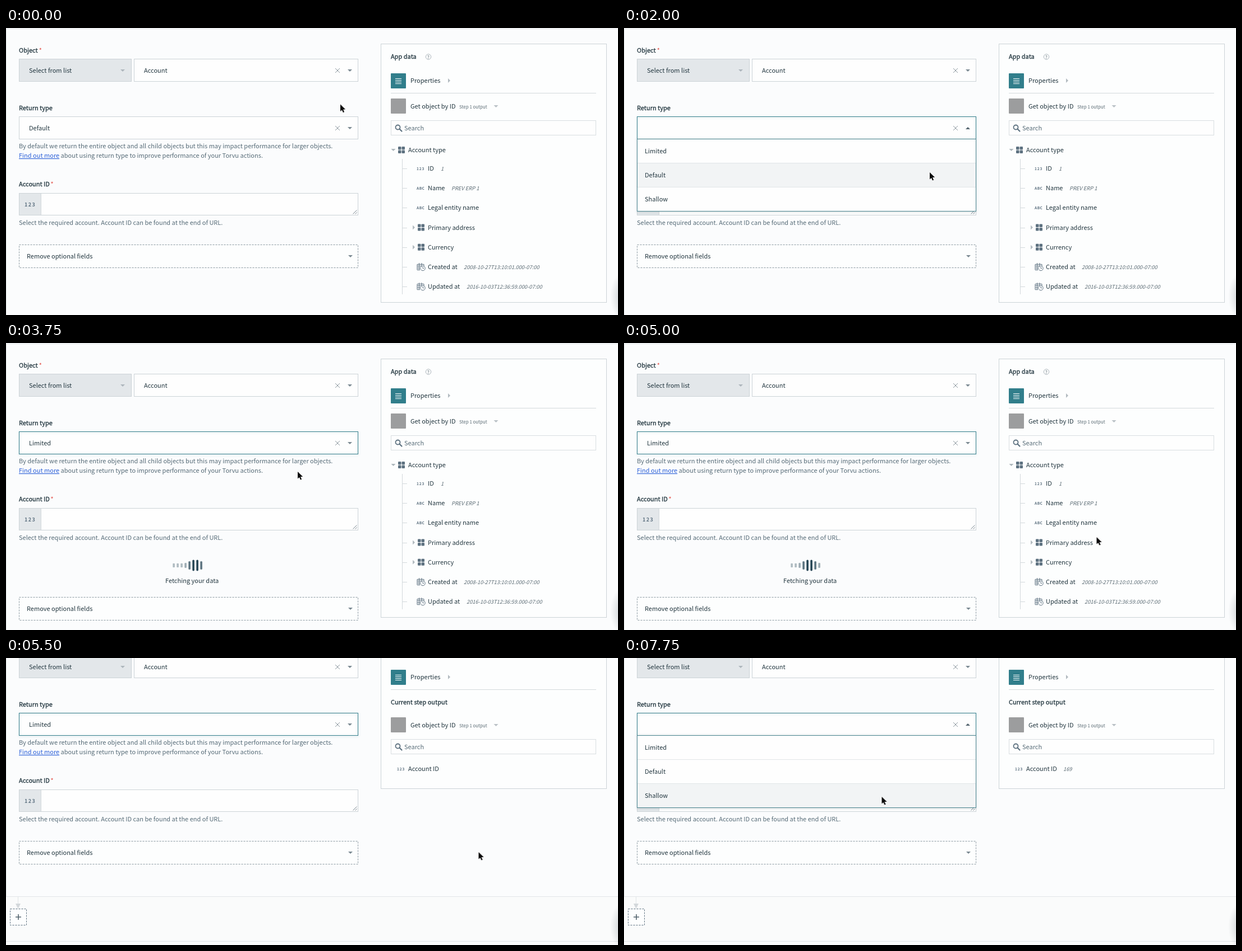
An HTML page that plays this animation: 1091 px wide and 513 px high, repeating every 8 s.

```html
<!DOCTYPE html>
<html lang="en">
<head>
<meta charset="utf-8">
<title>Return type</title>
<style>
html, body { margin: 0; width: 100%; height: 100%; overflow: hidden; background: #fbfcfd; }
svg { display: block; }
text { font: 11px "Noto Sans CJK JP", "Noto Sans CJK SC", "Noto Sans CJK KR", "Lato", sans-serif; fill: #22363f; white-space: pre; }
.label { font-weight: 500; stroke: #22363f; stroke-width: .3px; }
.req { fill: #e2453c; stroke: none; }
.help { fill: #566b77; }
.link { fill: #2a5fd8; text-decoration: underline; }
.sample { font-size: 9.35px; font-style: italic; fill: #5a6a73; }
.small { font-size: 7.9px; fill: #5a6a73; }
.type { font-size: 6.6px; font-weight: 700; letter-spacing: .9px; fill: #5d7180; }
.abc { letter-spacing: .4px; }
.num { font-size: 9px; letter-spacing: 1.5px; }
.box { fill: #fefefe; stroke: #ccd3d7; }
.rule { stroke: #d3d9dc; fill: none; }
.faint { stroke: #e1e5e7; fill: none; }
.dash { fill: #fdfefe; stroke: #8b99a1; stroke-dasharray: 3 2; }
.icon { fill: none; stroke: #5d7180; }
.focus { fill: none; stroke: #37808d; filter: drop-shadow(0 1px 2px rgba(55, 128, 141, .3)); }
.menu { fill: #fefefe; stroke: #4b8590; filter: drop-shadow(0 1px 2px rgba(40, 70, 80, .2)); }
</style>
</head>
<body>
<svg id="stage" width="1091" height="513" viewBox="0 0 1091 513"></svg>
<script>
const LOOP = 8000, TICK = 250;
const stage = document.getElementById('stage');

const text = (x, y, s, cls = '') => `<text x="${x}" y="${y}" class="${cls}">${s}</text>`;
const rect = (x, y, w, h, attrs) => `<rect x="${x}" y="${y}" width="${w}" height="${h}" ${attrs}/>`;
const path = (d, attrs) => `<path d="${d}" ${attrs}/>`;
const group = (id, body, attrs = '') => `<g id="${id}" ${attrs}>${body}</g>`;
const down = (x, y, c = '#7b8992') => path(`M${x - 4} ${y - 2}h8l-4 4z`, `fill="${c}"`);
const up = (x, y) => path(`M${x - 4} ${y + 2}h8l-4 -4z`, 'fill="#52636d"');
const right = (x, y) => path(`M${x - 2} ${y - 4}v8l4 -4z`, 'fill="#b3bbc0"');
const clear = y => path(`M587 ${y - 4}l8 8m0 -8l-8 8`, 'fill="none" stroke="#8a969d"');
const label = (y, s, req) => text(23, y, s + (req ? '<tspan class="req" dx="2">*</tspan>' : ''), 'label');

const grid = (x, y) => [0, 1, 2, 3].map(i =>
  rect(x - 6 + i % 2 * 6.5, y - 6 + (i >> 1) * 6.5, 5.5, 5.5, 'rx="1" fill="#5d7180"')).join('');

const calendar = (x, y) =>
  path(`M${x + 6} ${y + 5.5}h-5v-10h12v4M${x + 1} ${y - 1.5}h8M${x + 1} ${y + 2}h5M${x + 4.5} ${y - 7}v12M${x + 9} ${y - 7}v5`, 'class="icon"') +
  `<circle cx="${x + 11}" cy="${y + 2.5}" r="4.2" class="icon" style="fill:#fdfefe"/>` +
  path(`M${x + 11} ${y}v2.5h2`, 'class="icon"');

const form =
  label(44, 'Object', true) +
  rect(23.5, 55.5, 200, 40, 'fill="#e3e7ea" stroke="#ccd3d7"') + text(41, 80, 'Select from list') + down(208, 76, '#adb6bc') +
  rect(228.5, 55.5, 399, 40, 'class="box"') + text(246, 80, 'Account') + clear(76) + down(613, 76) +
  label(147, 'Return type') +
  text(23, 215, 'By default we return the entire object and all child objects but this may impact performance for larger objects.', 'help') +
  text(23, 232, '<tspan class="link">Find out more</tspan> about using return type to improve performance of your Torvu actions.', 'help') +
  label(283, 'Account ID', true) +
  rect(23.5, 295.5, 604, 39, 'class="box"') +
  rect(24, 296, 38, 38, 'fill="#e3e7ea"') + path('M62.5 296v38', 'class="rule"') + text(33, 318.5, '123', 'type num') +
  path('M618.5 332.5l7 -7m-3 7l3 -3', 'fill="none" stroke="#75838c"') +
  text(23, 352, 'Select the required account. Account ID can be found at the end of URL.', 'help') +
  group('optional', rect(23.5, 387.5, 604, 41, 'class="dash"') + text(37, 412, 'Remove optional fields') + down(614, 408));

const bars = Array.from({ length: 8 }, (_, i) =>
  rect(297.3 + i * 7, 387.5, 3.6, 20, 'rx="1.8" fill="#274655" class="bar" style="transform-box:fill-box;transform-origin:center"')).join('');
const loader = group('loader', bars + text(284, 429, 'Fetching your data', 'fetch'));

const picker =
  rect(23.5, 158.5, 604, 40, 'class="box"') +
  rect(23.5, 158.5, 604, 40, 'class="focus" id="focus"') +
  rect(23.5, 158.5, 604, 40, 'fill="none" stroke="#9ab8c0" id="blurred"') +
  group('valueDefault', text(41, 183, 'Default')) + group('valueLimited', text(41, 183, 'Limited')) +
  clear(179) + group('closed', down(613, 179)) + group('opened', up(613, 179)) +
  group('menu',
    rect(23.5, 198.5, 604, 129, 'class="menu"') +
    rect(24, 199, 603, 42, 'fill="#f2f4f5" id="hover"') +
    path('M24 241.5h603M24 284.5h603', 'class="faint"') +
    ['Limited', 'Default', 'Shallow'].map((s, i) => text(37, 224 + i * 43.2, s)).join(''));

const sourceRow =
  rect(686, 126, 27, 27, 'rx="1" fill="#9c9d9e"') +
  text(721, 144, 'Get object by ID') + text(808, 143.5, 'Step 1 output', 'small') + down(873.5, 140, '#b9c0c5') +
  rect(686.5, 165.5, 365, 26, 'fill="#fefefe" stroke="#d9dee1"') +
  `<circle cx="698.5" cy="177.5" r="4" class="icon" stroke-width="1.8"/>` +
  path('M701.5 180.5l4 4', 'class="icon" stroke-width="2.2" stroke-linecap="round"') +
  text(710, 183, 'Search', 'help');

const fields = [
  ['num', 'ID', 775, '1'], ['abc', 'Name', 794, 'PREV ERP 1'], ['abc', 'Legal entity name'],
  ['grid', 'Primary address'], ['grid', 'Currency'],
  ['date', 'Created at', 816, '2008-10-27T13:10:01.000-07:00'],
  ['date', 'Updated at', 821, '2016-10-03T12:36:59.000-07:00']
];
const fieldRow = ([kind, name, x, sample], i) => {
  const y = 251 + i * 35.2;
  const icon = {
    num: () => text(732, y + 2.5, '123', 'type'),
    abc: () => text(732, y + 2.5, 'ABC', 'type abc'),
    grid: () => right(727, y) + grid(740, y),
    date: () => calendar(732, y)
  }[kind]();
  return path(`M706 ${Math.round(y) + .5}h9`, 'class="rule"') + icon + text(752, y + 4, name) +
    (sample ? text(x, y + 4, sample, 'sample') : '');
};
const tree = group('tree',
  down(690.5, 218, '#aeb7bc') + grid(705, 218) + text(717, 222, 'Account type') +
  path('M706.5 234v242', 'class="rule"') + fields.map(fieldRow).join(''));

const panel =
  rect(668.5, 28.5, 402, 462, 'fill="#fdfefe" stroke="#ccd3d7" id="panel"') +
  text(686, 55, 'App data', 'label') +
  '<circle cx="753" cy="51.5" r="4.7" fill="none" stroke="#a9b3b9"/>' + text(751, 54.5, '?', 'small') +
  rect(686, 81, 27, 27, 'rx="1" fill="#317e8b"') +
  path('M694 90.5h11m-11 3h11m-11 3h11m-11 3h11', 'stroke="#fff" stroke-width="1.2"') +
  text(721, 98, 'Properties') + right(790, 94) +
  path('M686 116.5h366', 'class="rule"') +
  group('sourceRow', sourceRow) + tree +
  group('output',
    text(686, 143, 'Current step output', 'label') + text(697, 261, '123', 'type') +
    text(717, 262, 'Account ID') + group('count', text(783, 262, '169', 'sample')));

const footer = group('footer',
  rect(0, 487, 1091, 90, 'fill="#fafbfb"') +
  path('M0 486.5h1091M0 566.5h1091', 'class="faint"') +
  path('M21.5 487v13', 'class="faint"') + path('M17 499h9l-4.5 9z', 'fill="#d3d8db"') +
  rect(7.5, 508.5, 29, 29, 'class="dash" style="stroke:#5d7180"') +
  path('M17 523h10m-5 -5v10', 'stroke="#52636d" stroke-width="1.6"'));

stage.innerHTML =
  `<defs><radialGradient id="shade"><stop offset="0" stop-color="#56636b" stop-opacity=".28"/><stop offset="1" stop-color="#56636b" stop-opacity="0"/></radialGradient></defs>` +
  group('page',
    path('M0 1.5h1091M.5 2v600', 'class="faint"') + footer + form + loader + picker + panel) +
  '<ellipse cx="1099" cy="480" rx="22" ry="42" fill="url(#shade)"/>' +
  group('cursor', path('M0 0v12.6l2.9 -2.7 2 4.7 2.2 -.9 -2 -4.6h4z', 'fill="#0b0b0b" stroke="#fff" stroke-width=".9" paint-order="stroke"'));

// Hold each [ms, value] until the next entry.
function hold(el, prop, steps) {
  const frames = steps.map(([ms, v]) => ({ offset: ms / LOOP, [prop]: v, easing: 'step-end' }));
  frames.push({ offset: 1, [prop]: steps[steps.length - 1][1] });
  el.animate(frames, { duration: LOOP, iterations: Infinity });
}
const byId = id => document.getElementById(id);
const fade = (id, ...steps) => hold(byId(id), 'opacity', steps);
const move = (id, ...steps) => hold(byId(id), 'transform',
  steps.map(([ms, x, y]) => [ms, `translate(${x}px, ${y}px)`]));

const PICK = 3250, LOADED = 5250, REOPEN = 7250;

move('cursor',
  [0, 596, 136.5], [250, 611, 182.5], [1750, 590, 214], [2000, 545, 258], [2250, 510, 300],
  [2500, 500, 262], [2750, 497, 224], [3000, 497, 216.5],
  [3750, 520, 230], [4000, 600, 262], [4250, 700, 300], [4500, 795, 332], [4750, 842.5, 347],
  [6000, 815, 320], [6250, 745, 250], [6500, 665, 165], [6750, 622, 122], [7000, 610, 116],
  [7500, 540, 185], [7750, 459.5, 248]);
move('hover',
  [0, 0, 43], [1750, 0, 0], [2000, 0, 43], [2250, 0, 86], [2500, 0, 43], [2750, 0, 0],
  [7500, 0, 43], [7750, 0, 86]);
move('page', [0, 0, 0], [LOADED, 0, -60]);
move('optional', [0, 0, 0], [PICK, 0, 67], [LOADED, 0, 0]);
move('sourceRow', [0, 0, 0], [LOADED, 0, 40]);
hold(byId('panel'), 'height', [[0, '462px'], [LOADED, '265px']]);

fade('menu', [0, 0], [1250, 1], [PICK, 0], [REOPEN, 1]);
fade('focus', [0, 0], [1500, 1], [7000, 0], [REOPEN, 1]);
fade('blurred', [0, 0], [7000, 1], [REOPEN, 0]);
fade('opened', [0, 0], [1500, 1], [PICK, 0], [REOPEN, 1]);
fade('closed', [0, 1], [1500, 0], [PICK, 1], [REOPEN, 0]);
fade('valueDefault', [0, 1], [1250, 0]);
fade('valueLimited', [0, 0], [PICK, 1], [REOPEN, 0]);
fade('loader', [0, 0], [PICK, 1], [LOADED, 0]);
fade('tree', [0, 1], [LOADED, 0]);
fade('output', [0, 0], [LOADED, 1]);
fade('footer', [0, 0], [LOADED, 1]);
fade('count', [0, 0], [REOPEN, 1]);

// A wave runs rightwards through the loader bars.
document.querySelectorAll('.bar').forEach((bar, i) => {
  const scale = [], alpha = [];
  for (let ms = 0; ms < LOOP; ms += TICK) {
    const peak = (4.5 + (ms - 5000) / TICK * 3 + 120) % 8;
    const d = Math.max(0, Math.abs(i - peak) - .5);
    const lift = Math.exp(-d * d / 2);
    scale.push([ms, `scaleY(${.35 + .65 * lift})`]);
    alpha.push([ms, .35 + .65 * lift]);
  }
  hold(bar, 'transform', scale);
  hold(bar, 'opacity', alpha);
});
</script>
</body>
</html>
```
